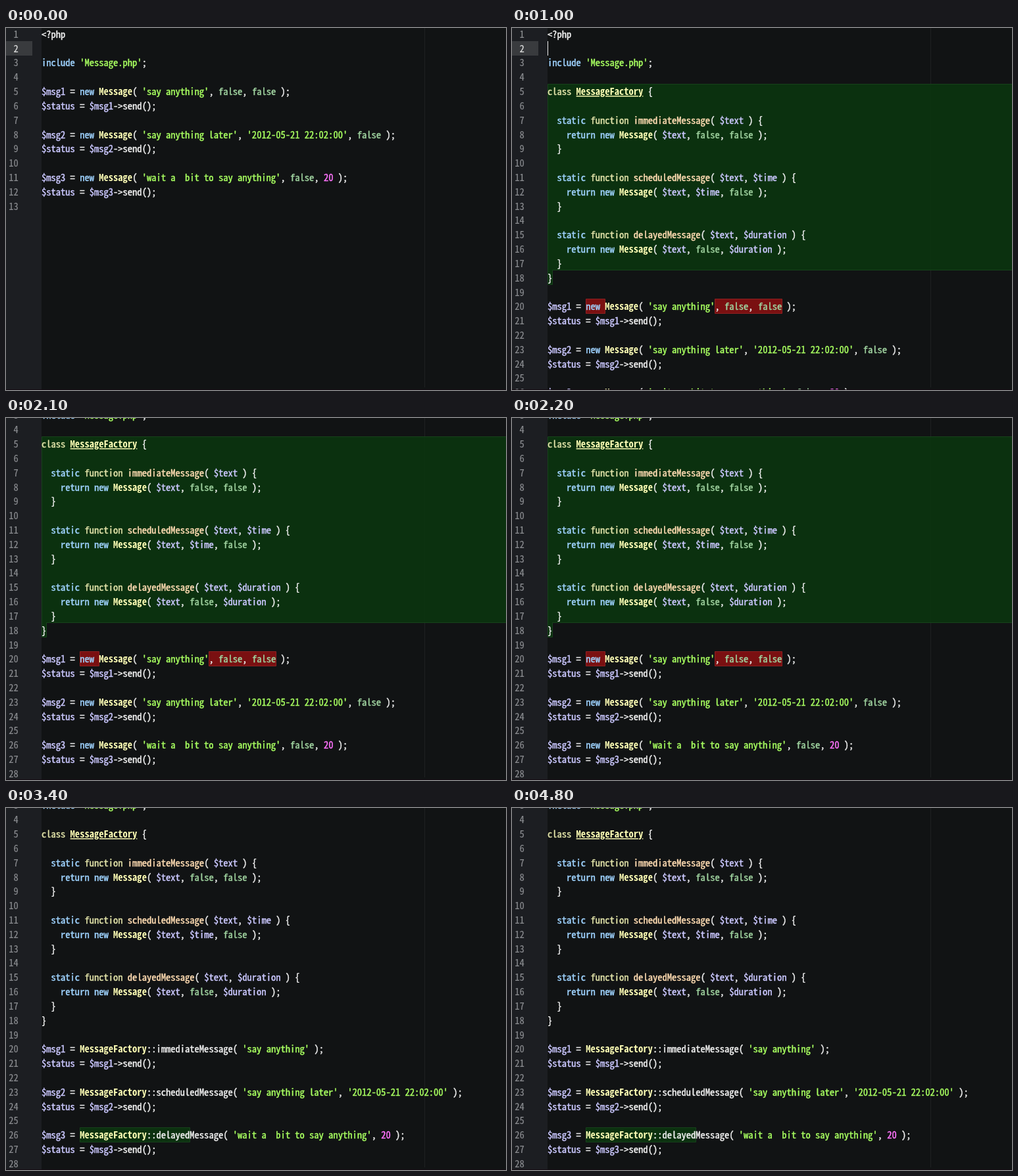
An HTML page for the animation above (5.3 s loop, 760 px wide and 551 px high).

```html
<!DOCTYPE html>
<html lang="en">
<head>
<meta charset="utf-8">
<title>Factory refactoring</title>
<style>
  html, body { margin: 0; width: 100%; height: 100%; overflow: hidden; background: #111314; }
  svg { display: block; width: 760px; height: 551px; }
  text { font-family: "Noto Sans Mono CJK JP", "Noto Sans Mono CJK SC", "Noto Sans Mono", monospace; white-space: pre;
    color: #f0f0f0; fill: currentColor; stroke: currentColor; stroke-width: .45; }
  .num { color: #8b8d91; stroke-width: .15; text-anchor: end; }
  .current { color: #e2e2e2; }
  .var { color: #cbc8ff; }
  .key { color: #9fd3ff; }
  .type { color: #e1e2a8; }
  .name { color: #ffffb6; font-weight: bold; stroke-width: 0; }
  .def { text-decoration: underline; }
  .func { color: #ffdcb2; }
  .str { color: #a8ff60; }
  .bool { color: #9fd29f; }
  .digit { color: #ff73fd; }
  .added { fill: #0b350f; fill-opacity: .9; stroke: #17421b; }
  .removed { fill: #7a1011; stroke: #8e2021; }
</style>
</head>
<body>
<svg viewBox="0 0 760 551">
  <rect width="760" height="551" fill="#111314"/>
  <rect width="54" height="551" fill="#1c1e22"/>
  <path d="M636.5 0V547" stroke="#fff" stroke-opacity=".06"/>
  <g id="page"></g>
  <rect y="550" width="760" height="1" fill="#140b12"/>
  <path id="mouse" d="M294 491.5q3 0 3 2q0-2 3-2M297 493v8M294 502.5q3 0 3-2q0 2 3 2M295.5 498h3" fill="none" stroke="#ededed"/>
</svg>
<script>
const LOOP = 5300, STEP = 100;
const LEFT = 54, CHAR = 7.27, ROW = 21.82, TOP = -1.6, BASE = 16.4;
const WIDTH = 760, SCROLL = 57;
const INSERT = 800, EDIT = [2300, 2700, 3300];
const page = document.getElementById("page");
const mouse = document.getElementById("mouse");

const head = ["<?php", "", "include 'Message.php';", ""];
const factory = ["class MessageFactory {", "",
  ...method("immediate", "$text", "$text, false, false"), "",
  ...method("scheduled", "$text, $time", "$text, $time, false"), "",
  ...method("delayed", "$text, $duration", "$text, false, $duration"),
  "}", ""];
const before = [
  "new Message( 'say anything', false, false );",
  "new Message( 'say anything later', '2012-05-21 22:02:00', false );",
  "new Message( 'wait a  bit to say anything', false, 20 );"];
const after = [
  "MessageFactory::immediateMessage( 'say anything' );",
  "MessageFactory::scheduledMessage( 'say anything later', '2012-05-21 22:02:00' );",
  "MessageFactory::delayedMessage( 'wait a  bit to say anything', 20 );"];
const dropped = [", false, false", ", false", "false, "];

function method(kind, params, args) {
  return [`  static function ${kind}Message( ${params} ) {`,
    `    return new Message( ${args} );`, "  }"];
}

const rowTop = line => TOP + (line - 1) * ROW;
const colX = col => LEFT + col * CHAR;
// Marked areas snap to whole pixels and carry a one pixel border.
const edgeX = col => Math.round(colX(col)) + .5;
const edgeY = line => Math.round(rowTop(line)) - .5;
const escapeText = s => s.replace(/&/g, "&amp;").replace(/</g, "&lt;");

function mark(cls, line, col, len) {
  return `<path class="${cls}" d="M${edgeX(col)} ${edgeY(line)}H${edgeX(col + len)}V${edgeY(line + 1)}H${edgeX(col)}Z"/>`;
}

// Full rows from first up to last, then one column of the last row.
function markBlock(cls, first, last) {
  return `<path class="${cls}" d="M${edgeX(0)} ${edgeY(first)}H${WIDTH + 1}V${edgeY(last)}H${edgeX(1)}V${edgeY(last + 1)}H${edgeX(0)}Z"/>`;
}

function kindOf(token, previous) {
  if (token[0] === "'") return "str";
  if (token[0] === "$") return "var";
  if (previous === "function") return "func";
  if (previous === "class") return "name def";
  if (/^(new|return|include|static)$/.test(token)) return "key";
  if (/^(class|function)$/.test(token)) return "type";
  if (/^(Message|MessageFactory)$/.test(token)) return "name";
  if (token === "false") return "bool";
  if (/^\d+$/.test(token)) return "digit";
  return "";
}

function codeLine(source, line) {
  const y = rowTop(line) + BASE;
  let out = "", previous = "";
  for (const m of source.matchAll(/'[^']*'|\$\w+|\w+|[^\s\w$']+/g)) {
    out += `<text class="${kindOf(m[0], previous)}" x="${colX(m.index)}" y="${y}">${escapeText(m[0])}</text>`;
    previous = m[0];
  }
  return out;
}

// Stage 0 is the plain script, 1 adds the class, 2 to 4 rewrite one call each.
function drawStage(stage) {
  const lines = [...head, ...(stage ? factory : [])];
  const done = Math.max(0, stage - 1);
  let marks = stage === 1 ? markBlock("added", 5, 18) : "";
  before.forEach((call, i) => {
    const text = `$msg${i + 1} = ` + (i < done ? after[i] : call);
    const line = lines.length + 1;
    if (stage && i === done) {
      marks += mark("removed", line, 8, 4);
      marks += mark("removed", line, text.indexOf(dropped[i]), dropped[i].length);
    }
    if (i === done - 1) marks += mark("added", line, 8, text.indexOf("Message(") - 8);
    lines.push(text, `$status = $msg${i + 1}->send();`, "");
  });
  const numbers = lines.map((_, i) =>
    `<text class="num${i === 1 ? " current" : ""}" x="18.7" y="${rowTop(i + 1) + BASE}">${i + 1}</text>`);
  page.innerHTML =
    `<rect y="20" width="40" height="22" fill="#393b3e"/>` +
    marks + numbers.join("") + lines.map((s, i) => codeLine(s, i + 1)).join("") +
    `<rect id="caret" x="54" y="20" width="1" height="22" fill="#ededed"/>`;
}

function scrollAt(t) {
  const p = Math.min(1, Math.max(0, (t - 1200) / 600));
  return Math.round(SCROLL * (1 - (1 - p) ** (5 / 3)));
}

let shown = -1;
function render(time) {
  const t = Math.floor((time % LOOP) / STEP) * STEP;
  const stage = t < INSERT ? 0 : 1 + EDIT.filter(at => t >= at).length;
  if (stage !== shown) drawStage(shown = stage);
  page.setAttribute("transform", `translate(0 ${-scrollAt(t)})`);
  const caretOn = (t >= 200 && t < 700) || t >= 900;
  document.getElementById("caret").style.display = caretOn ? "" : "none";
  mouse.style.display = t >= 1300 && t < 1900 ? "" : "none";
}

// Choose the font size whose natural advance equals one column.
function fitFont() {
  page.innerHTML = "<text>0</text>";
  const pen = document.createElement("canvas").getContext("2d");
  pen.font = `100px ${getComputedStyle(page.firstChild).fontFamily}`;
  page.setAttribute("font-size", CHAR * 100 / pen.measureText("0").width);
}

fitFont();
const start = performance.now();
function tick() {
  render(performance.now() - start);
  requestAnimationFrame(tick);
}
tick();
</script>
</body>
</html>
```
